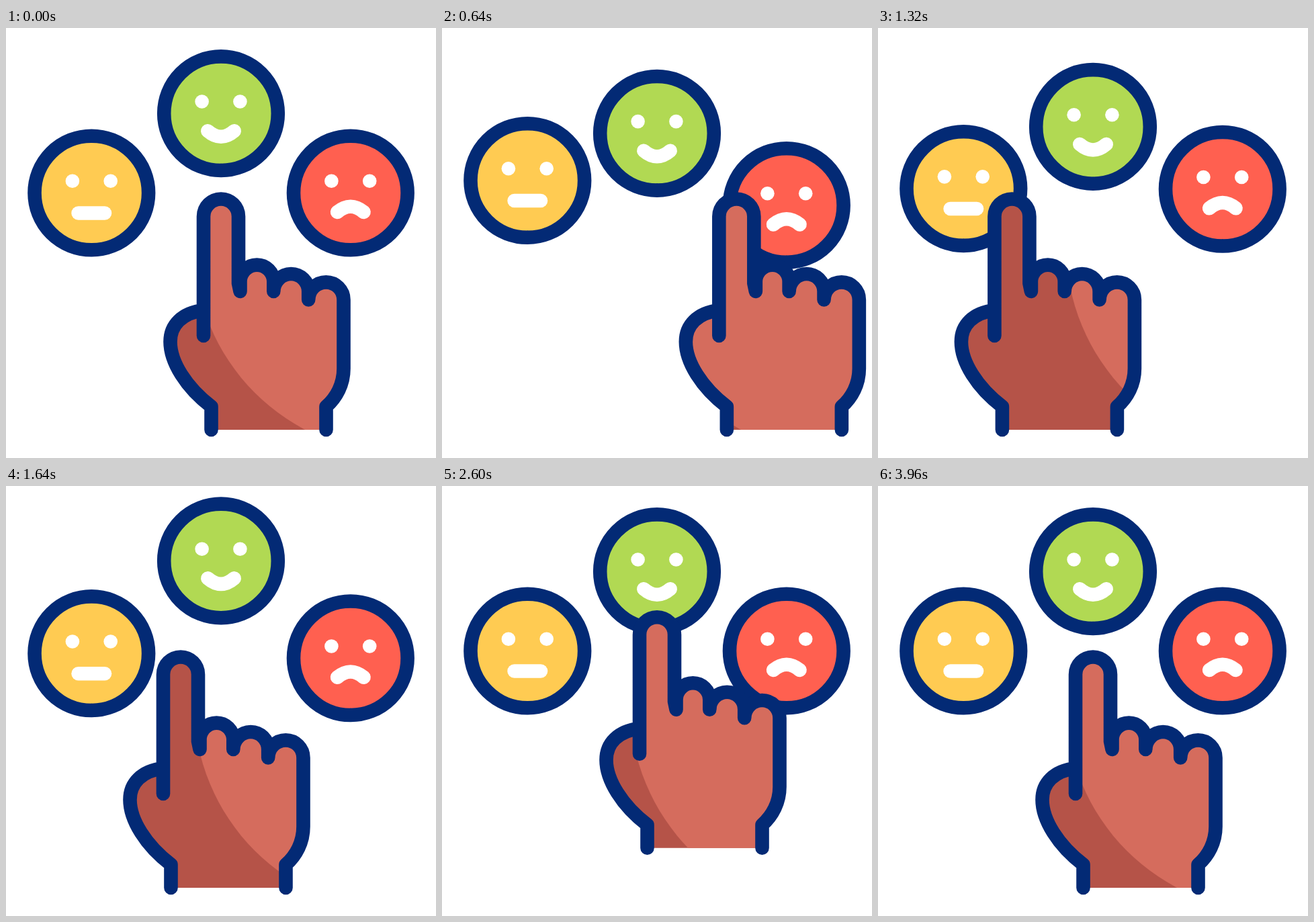
Animation of 640x640 px, one loop 4000 ms. Source, as an HTML page with a canvas:

```html
<!DOCTYPE html>
<html lang="en">
<head>
<meta charset="utf-8">
<title>Feedback</title>
<style>
  html, body { margin: 0; width: 100%; height: 100%; overflow: hidden; background: #fff; }
  canvas { display: block; width: 640px; height: 640px; }
</style>
</head>
<body>
<canvas id="stage" width="640" height="640"></canvas>
<script>
const ctx = document.getElementById('stage').getContext('2d');
const LOOP = 4000;
const TURN = 2 * Math.PI;
const LINE = 20.6;
const NAVY = '#032a75', GREEN = '#b1d953', YELLOW = '#ffcb52', RED = '#ff6050';
const SKIN = '#d56c5d', SHADE = '#b55348';

// Eased 0 to 1 between two times
function ramp(t, from, to) {
  const u = Math.min(1, Math.max(0, (t - from) / (to - from)));
  return u * u * (3 - 2 * u);
}

// Rise to a first peak, then swing to and fro with shrinking peaks, at rest after four steps
function swing(t, first, step, height, decay) {
  const peak = k => k < 0 || k > 3 ? 0 : height * (-decay) ** k;
  if (t < first) return height * ramp(t, 0, first);
  const k = Math.floor((t - first) / step);
  const begin = first + k * step;
  return peak(k) + (peak(k + 1) - peak(k)) * ramp(t, begin, begin + step);
}

const handX = t => 120.6 * (ramp(t, 0, 600) - 2 * ramp(t, 600, 1320) + ramp(t, 1320, 1960));
const handY = t => 118 * (ramp(t, 3175, 3930) - ramp(t, 2320, 2880));

const THUMB = 'M305.5 598 V563.5 C268 535 244.5 497 244.5 467 C244.5 442 262 424 294 420';
const FINGERS = 'V280.5 a26 26 0 0 1 52 0 V380 l2.5 12 V377.5 a24.9 24.9 0 0 1 49.8 0' +
  ' V392 a25.9 25.9 0 0 1 51.9 0 V404.5 a26.1 26.1 0 0 1 52.3 0' +
  ' V507 C502.5 530 492 550 476.5 563.5 V598';
const palm = new Path2D(THUMB + FINGERS + 'Z');
const outline = new Path2D(THUMB + 'M294 458' + FINGERS);

const SMILE = new Path2D('M-19.7 26 Q0 43 19.7 26');
const FLAT = new Path2D('M-19.7 30 H19.7');
const FROWN = new Path2D('M-19.7 28.5 Q0 12 19.7 28.5');

function disc(x, y, r, color) {
  ctx.fillStyle = color;
  ctx.beginPath();
  ctx.arc(x, y, r, 0, TURN);
  ctx.fill();
}

// Part of the rim, in turns clockwise from the bottom
function rim(color, width, from, to) {
  ctx.strokeStyle = color;
  ctx.lineWidth = width;
  ctx.beginPath();
  ctx.arc(0, 0, 84.8, TURN * (from + 0.25), TURN * (to + 0.25));
  ctx.stroke();
}

function face(x, y, color, mouth, tail = 0, head = 0) {
  ctx.save();
  ctx.translate(x, y);
  disc(0, 0, 80, color);
  rim(NAVY, LINE, 0, 1);
  if (head > tail) rim(YELLOW, 23.4, tail, head);
  for (const side of [-1, 1]) disc(side * 28.4, -17.7, 10.3, '#fff');
  ctx.strokeStyle = '#fff';
  ctx.lineWidth = LINE;
  ctx.stroke(mouth);
  ctx.restore();
}

function hand(x, y) {
  ctx.save();
  ctx.translate(x, y);
  ctx.fillStyle = SHADE;
  ctx.fill(palm);
  ctx.save();
  ctx.clip(palm);
  ctx.translate(-x, -y);
  disc(588, 325, 308, SKIN); // the light stays put while the hand moves
  ctx.restore();
  ctx.strokeStyle = NAVY;
  ctx.lineWidth = LINE;
  ctx.stroke(outline);
  ctx.restore();
}

function draw(t) {
  ctx.fillStyle = '#fff';
  ctx.fillRect(0, 0, 640, 640);
  ctx.lineCap = ctx.lineJoin = 'round';
  face(127.3, 245.5 + swing(t, 640, 340, -18.5, 0.59), YELLOW, FLAT);
  face(512.8, 245.5 + swing(t, 800, 370, 20.6, 0.893), RED, FROWN);
  face(320, 127.2 + swing(t, 620, 346, 30.2, 0.81), GREEN, SMILE,
    ramp(t, 3165, 3830), ramp(t, 2880, 3486));
  hand(handX(t), handY(t));
}

const start = performance.now();
function tick() {
  draw((performance.now() - start) % LOOP);
  requestAnimationFrame(tick);
}
tick();
</script>
</body>
</html>
```
